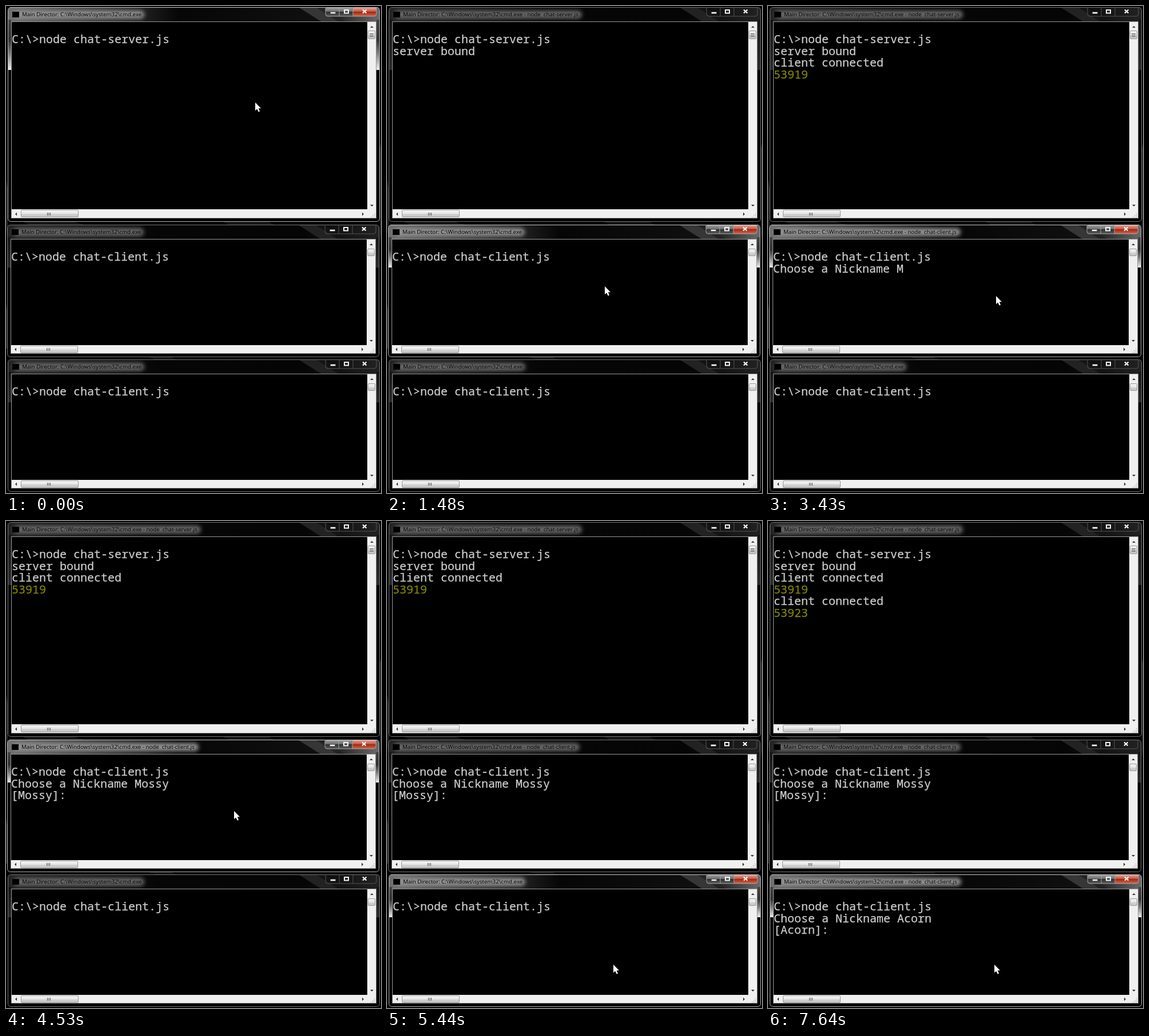
An HTML page for the animation above (8 s loop, 656 px wide and 853 px high).

```html
<!DOCTYPE html>
<html lang="en">
<head>
<meta charset="utf-8">
<title>Chat consoles</title>
<style>
html, body { margin: 0; width: 100%; height: 100%; overflow: hidden; background: #000; }
svg { display: block; }
text { white-space: pre; }
.con { font: 20px "Noto Sans Mono", monospace; fill: #cdcdcd; stroke: #cdcdcd; stroke-width: .25; }
.cap { font: 9.75px "Open Sans", sans-serif; fill: #000; }
.port { fill: #858500; stroke: #858500; }
</style>
</head>
<body>
<svg id="stage" width="656" height="853" viewBox="0 0 656 853">
<defs>
  <linearGradient id="bar">
    <stop offset="0" stop-color="#707070"/><stop offset=".12" stop-color="#525252"/>
    <stop offset=".36" stop-color="#202020"/><stop offset=".46" stop-color="#060606"/>
    <stop offset=".86" stop-color="#101010"/><stop offset="1" stop-color="#6a6a6a"/>
  </linearGradient>
  <linearGradient id="dimBar">
    <stop offset="0" stop-color="#242424"/><stop offset=".4" stop-color="#060606"/>
    <stop offset=".8" stop-color="#050505"/><stop offset="1" stop-color="#222"/>
  </linearGradient>
  <linearGradient id="side" x2="0" y2="1">
    <stop offset="0" stop-color="#444"/><stop offset=".4" stop-color="#333"/>
    <stop offset=".65" stop-color="#777"/><stop offset="1" stop-color="#eee"/>
  </linearGradient>
  <linearGradient id="dimSide" x2="0" y2="1">
    <stop offset="0" stop-color="#161616"/><stop offset="1" stop-color="#2c2c2c"/>
  </linearGradient>
  <linearGradient id="red" x2="0" y2="1">
    <stop offset="0" stop-color="#dfa596"/><stop offset=".45" stop-color="#c4543f"/>
    <stop offset=".5" stop-color="#a52512"/><stop offset="1" stop-color="#cf6a4c"/>
  </linearGradient>
  <linearGradient id="glass" x2="0" y2="1">
    <stop offset="0" stop-color="#a0a0a0"/><stop offset=".45" stop-color="#6c6c6c"/>
    <stop offset=".5" stop-color="#303030"/><stop offset="1" stop-color="#5a5a5a"/>
  </linearGradient>
  <linearGradient id="thumb" x2="0" y2="1">
    <stop offset="0" stop-color="#f6f6f6"/><stop offset=".5" stop-color="#e6e6e6"/>
    <stop offset=".55" stop-color="#d2d2d2"/><stop offset="1" stop-color="#c6c6c6"/>
  </linearGradient>
  <filter id="blur" x="-10%" y="-80%" width="120%" height="260%"><feGaussianBlur stdDeviation="3.5"/></filter>
</defs>
</svg>
<script>
const LOOP = 8000, CELL = 12, ROW = 20.5;
const stage = document.getElementById('stage');

const rect = (x, y, w, h, fill, more = '') =>
  `<rect x="${x}" y="${y}" width="${w}" height="${h}" fill="${fill}" ${more}/>`;
const path = (d, fill, more = '') => `<path d="${d}" fill="${fill}" ${more}/>`;
const during = (from, to, body) => `<g data-from="${from}" data-to="${to}">${body}</g>`;

// Console text and block cursor, placed by row and column
const line = (row, text, col = 0, cls = '') =>
  `<text class="con ${cls}" x="${7 + col * CELL}" y="${63 + row * ROW}">${text}</text>`;
const cursor = (row, col = 0) => rect(7.5 + col * CELL, 62.5 + row * ROW, 11.5, 5, '#c8c8c8');

function frame(h, on, edge) {
  const buttons = 'M556 0V12q0 4 4 4H641q4 0 4-4V0';
  return rect(.5, .5, 650, h - 1, '#000', 'rx="5"')
    + rect(1, 1, 649, 24, on ? 'url(#bar)' : 'url(#dimBar)', 'rx="4"')
    + path('M510 1H541L578 25H548Z', on ? '#363636' : '#222')
    + path('M541 1H556L590 25H578Z', on ? '#242424' : '#141414')
    + [1, 645].map(x => rect(x, 22, 5, edge - 22, on ? 'url(#side)' : 'url(#dimSide)')).join('')
    + rect(.5, .5, 650, h - 1, 'none', `rx="5" stroke="${on ? '#b4b4b4' : '#767676'}"`)
    + (on ? rect(4, 0, 643, 1, '#ccc')
      + rect(556, 1, 48, 15, 'url(#glass)', 'rx="3"')
      + path('M604 1H645V12q0 4-4 4H604Z', 'url(#red)') : '')
    + path(buttons + 'M580 1V16M604 1V16', 'none', `stroke="${on ? '#a5a5a5' : '#555'}"`);
}

function caption(text, end, on) {
  return rect(10, 6, end - 6, 14, on ? '#909090' : '#666', 'rx="7" filter="url(#blur)"')
    + `<text class="cap" x="25" y="16">${text}</text>`;
}

function scrollbars(h, rows, top, len, grip) {
  const y = Math.round(26 + rows * ROW), mid = h - 13.5;
  let s = rect(629, 26, 15, h - 33, '#f0f0f0') + rect(7, y, 637, h - 7 - y, '#f0f0f0')
    + rect(23.5, y + 1.5, 100, 12, 'url(#thumb)', 'rx="1.5" stroke="#999"')
    + rect(630.5, top + .5, 12, len, 'url(#thumb)', 'rx="1.5" stroke="#999"')
    + path(`M634 36H640L637 33ZM634 ${h - 30}H640L637 ${h - 27}Z`, '#333')
    + path(`M16 ${mid - 3}V${mid + 3}L13 ${mid}ZM620 ${mid - 3}V${mid + 3}L623 ${mid}Z`, '#333');
  for (let i = 0; i < 3; i++) {
    s += rect(69 + i * 2.5, mid - 2.5, 1, 5, '#555');
    if (grip) s += rect(633, top + 5 + i * 2.5, 7, 1, '#555');
    for (let j = 0; j <= i; j++) s += rect(641 - j * 3, h - 15 + i * 3, 1.5, 1.5, '#b5b5b5');
  }
  return s;
}

function glyphs() {
  return rect(564.5, 8.5, 9, 3, '#fff', 'stroke="#444" stroke-width=".6"')
    + rect(589, 5, 7, 5.5, 'none', 'stroke="#f4f4f4" stroke-width="2"')
    + path('M621 4.5L627.5 10.5M627.5 4.5L621 10.5', 'none', 'stroke="#fff" stroke-width="2.2"');
}

function win(o) {
  const base = 'Main Director: C:\\Windows\\system32\\cmd.exe';
  const [a, b] = o.active;
  const look = (from, to, on) => from >= to ? '' : during(from, to, frame(o.h, on, o.edge))
    + during(from, Math.min(to, o.run), caption(base, 235, on))
    + during(Math.max(from, o.run), to, caption(`${base} - node  ${o.file}`, o.end, on));
  return `<g transform="translate(${o.x} ${o.y})">`
    + look(0, a, false) + look(a, b, true) + look(b, LOOP, false)
    + rect(8, 8, 12, 10, '#000') + glyphs()
    + rect(6.5, 25.5, 638, o.h - 32, '#000', 'stroke="#999"')
    + scrollbars(o.h, o.rows, ...o.thumb)
    + line(0, `C:\\&gt;node ${o.file}`) + o.body + '</g>';
}

// A nickname appears letter by letter, then becomes the prompt
const typed = (name, times, done) =>
  [...name].map((c, i) => during(times[i], LOOP, line(1, c, 18 + i))).join('')
  + during(done, LOOP, line(2, `[${name}]:`));
const joined = (t, row, port) =>
  during(t, LOOP, line(row, 'client connected') + line(row + 1, port, 0, 'port'));
const ask = t => during(t, LOOP, line(1, 'Choose a Nickname'));

const client = 'chat-client.js';
const wallpaper = path('M0 300L3 320V420L0 380ZM0 520L3 540V600H0ZM654 250L656 240V400L654 420Z', '#262626')
  + path('M30 378H120L140 384H40ZM380 378H460L470 384H390ZM250 615H290L300 620H262Z', '#161616');

const pointer = '<g id="mouse">' + path('M0 0V14.2L3.2 11.3L5.6 16.6L8 15.5L5.7 10.3H10Z', '#fff') + '</g>';

stage.insertAdjacentHTML('beforeend', wallpaper
  + win({ x: 3, y: 2, h: 376, rows: 16, edge: 110, active: [0, 1420], run: 490, end: 334,
    file: 'chat-server.js', thumb: [41, 14, true],
    body: during(490, 710, cursor(1)) + during(710, LOOP, line(1, 'server bound'))
      + joined(2070, 2, '53919') + joined(5990, 4, '53923') })
  + win({ x: 2, y: 383, h: 232, rows: 9, edge: 75, active: [1420, 5440], run: 1780, end: 331,
    file: client, thumb: [42, 12, false],
    body: during(1780, 2070, cursor(1)) + ask(2070) + during(3000, 3430, cursor(1, 18))
      + typed('Mossy', [3430, 3610, 3800, 3980, 4100], 4530) })
  + win({ x: 3, y: 619, h: 232, rows: 9, edge: 75, active: [5440, LOOP], run: 5870, end: 331,
    file: client, thumb: [42, 12, false],
    body: during(5870, 5990, cursor(1)) + ask(5990)
      + typed('Acorn', [6730, 6920, 7010, 7100, 7280], 7640) })
  + pointer);

// The pointer holds each place until the next one
const moves = [
  [0, 436, 169], [1070, 420, 235], [1130, 390, 365], [1190, 366, 472], [1370, 381, 491],
  [1660, 380, 500], [1720, 379, 514], [1780, 378, 530], [1840, 377, 546], [1890, 376, 559],
  [1950, 375, 567], [2010, 378, 552], [2070, 384, 527], [2130, 390, 511], [2190, 399, 508],
  [5090, 402, 580], [5150, 400, 700], [5210, 397, 773], [5440, 396, 777]
];
const mouse = document.getElementById('mouse');
const timed = [...stage.querySelectorAll('[data-from]')]
  .map(el => ({ el, from: +el.dataset.from, to: +el.dataset.to }));

function draw(t) {
  for (const { el, from, to } of timed) el.style.display = t >= from && t < to ? '' : 'none';
  const [, x, y] = moves.findLast(m => m[0] <= t);
  mouse.setAttribute('transform', `translate(${x} ${y})`);
}

const start = performance.now();
function tick() {
  draw((performance.now() - start) % LOOP);
  requestAnimationFrame(tick);
}
draw(0);
requestAnimationFrame(tick);
</script>
</body>
</html>
```
